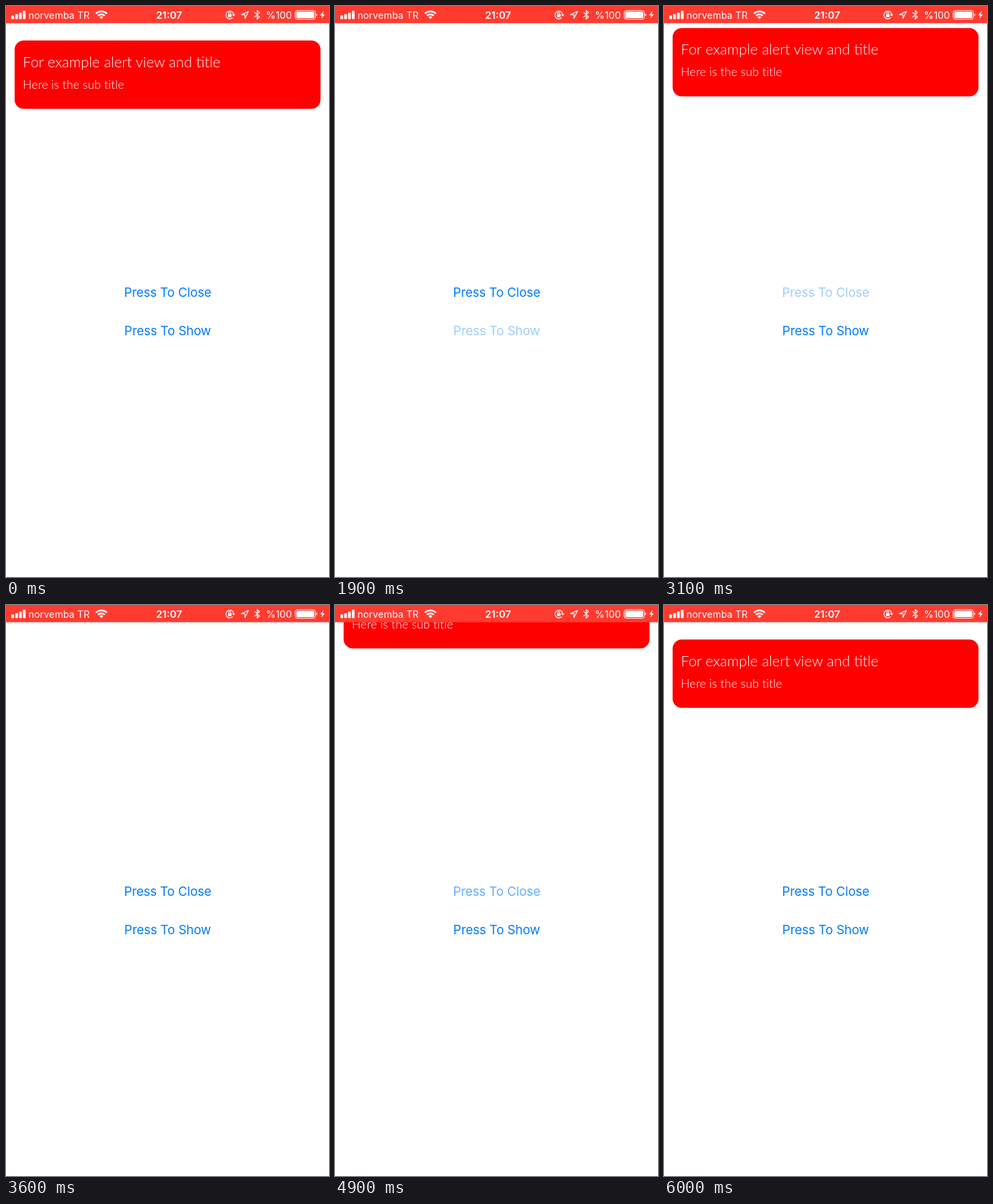
Write an HTML page that moves like this. It is 480x848 px and loops after 6.1 s.

```html
<!DOCTYPE html>
<html lang="en">
<head>
<meta charset="utf-8">
<title>Alert view</title>
<style>
  html, body { margin: 0; width: 100%; height: 100%; overflow: hidden; background: #fff; }
  svg { display: block; width: 480px; height: 848px; }
  text { font-family: Inter, Roboto, sans-serif; }
  .card text { font-family: Lato, "Open Sans", sans-serif; font-weight: 300; fill: #fff; }
  .button { font-size: 18.6px; letter-spacing: -.1px; text-anchor: middle; fill: #007aff; }
  .status text { font-size: 14.6px; }
  .line { fill: none; stroke: #fff; stroke-width: 1.2; stroke-linejoin: round; stroke-linecap: round; }
</style>
</head>
<body>
<svg viewBox="0 0 480 848">
  <rect width="480" height="848" fill="#fff"/>
  <text class="button" id="close" x="240.3" y="431.5">Press To Close</text>
  <text class="button" id="show" x="240.3" y="488.6">Press To Show</text>

  <g class="card" id="card">
    <rect x="12.8" y="51.2" width="454.6" height="101.6" rx="13.5" fill="#f00"/>
    <text x="25" y="91" font-size="21.8">For example alert view and title</text>
    <text x="25" y="122.8" font-size="17.6" letter-spacing=".1">Here is the sub title</text>
  </g>

  <g class="status" fill="#fff">
    <rect width="480" height="25.6" fill="#ff3b30"/>
    <!-- signal -->
    <rect x="8" y="14" width="4" height="5.5" rx="1"/>
    <rect x="13.7" y="12" width="4" height="7.5" rx="1"/>
    <rect x="19.4" y="9.7" width="4" height="9.8" rx="1"/>
    <rect x="25.1" y="7" width="4" height="12.5" rx="1"/>
    <text x="33.5" y="18.6" style="font-size:14px" letter-spacing=".2">norvemba TR</text>
    <!-- wifi -->
    <g fill="none" stroke="#fff" stroke-width="2.4">
      <path d="M133.6 11.3a11.8 11.8 0 0 1 16.4 0"/>
      <path d="M136.7 14.5a7.4 7.4 0 0 1 10.2 0"/>
    </g>
    <path d="M141.8 19.6l-2.9-3a4.1 4.1 0 0 1 5.8 0z"/>
    <text x="242.3" y="18.6" text-anchor="middle" font-weight="600" style="font-size:15px">21:07</text>
    <!-- rotation lock -->
    <path class="line" d="M336.6 17.6a5.8 5.8 0 1 1 1.8-4.6"/>
    <path d="M335.8 12.4h5l-2.5 3.1z"/>
    <rect x="329.8" y="12.2" width="5.4" height="4.2" rx=".6"/>
    <path class="line" d="M331 12.2v-1.2a1.5 1.5 0 0 1 3 0v1.2"/>
    <!-- location -->
    <path class="line" d="M360.4 8l-10.6 4.9h5.3v5.6z"/>
    <!-- bluetooth -->
    <path class="line" d="M369.6 9.6l7 6.7-3.3 3.2V6.5l3.3 3.2-7 6.7"/>
    <text x="425" y="18.6" text-anchor="end">%100</text>
    <!-- battery -->
    <rect x="429.8" y="6.9" width="29.8" height="12.8" rx="3" class="line" style="stroke-width:1"/>
    <rect x="431.5" y="8.6" width="26.4" height="9.4" rx="1.6"/>
    <path d="M460.9 11v4.6q1.5-.6 1.5-2.3t-1.5-2.3z"/>
    <path d="M471.9 7.6l-5 6.2h3.1l-1.4 5 5.2-6.4h-3.2z"/>
  </g>
</svg>
<script>
  const LOOP = 6100, STEP = 100, HOLD = 40, SLIDE = 300, FADE = 470;
  const TRAVEL = 153.6, DIM = 0.2;

  // release time of each tap
  const taps = [
    { at: 770, id: 'close' }, { at: 1835, id: 'show' },
    { at: 3035, id: 'close' }, { at: 3780, id: 'show' },
    { at: 4735, id: 'close' }, { at: 5480, id: 'show' }
  ];

  const $ = id => document.getElementById(id);
  const card = $('card'), buttons = { close: $('close'), show: $('show') };
  const clamp = x => Math.min(1, Math.max(0, x));
  const easeInOut = x => x * x * (3 - 2 * x);
  const easeOut = x => 1 - Math.pow(1 - x, 1.65);

  function draw(t) {
    let hidden = 0;
    const alpha = { close: 1, show: 1 };
    for (const { at, id } of taps) {
      if (t < at - HOLD) break;
      const slide = easeInOut(clamp((t - at) / SLIDE));
      hidden = id === 'close' ? slide : 1 - slide;
      alpha[id] = DIM + (1 - DIM) * easeOut(clamp((t - at) / FADE));
    }
    card.setAttribute('transform', `translate(0 ${-TRAVEL * hidden})`);
    for (const id in buttons) buttons[id].setAttribute('opacity', alpha[id]);
  }

  function tick() {
    const t = performance.now() % LOOP;
    draw(Math.floor(t / STEP) * STEP);
    requestAnimationFrame(tick);
  }
  tick();
</script>
</body>
</html>
```
